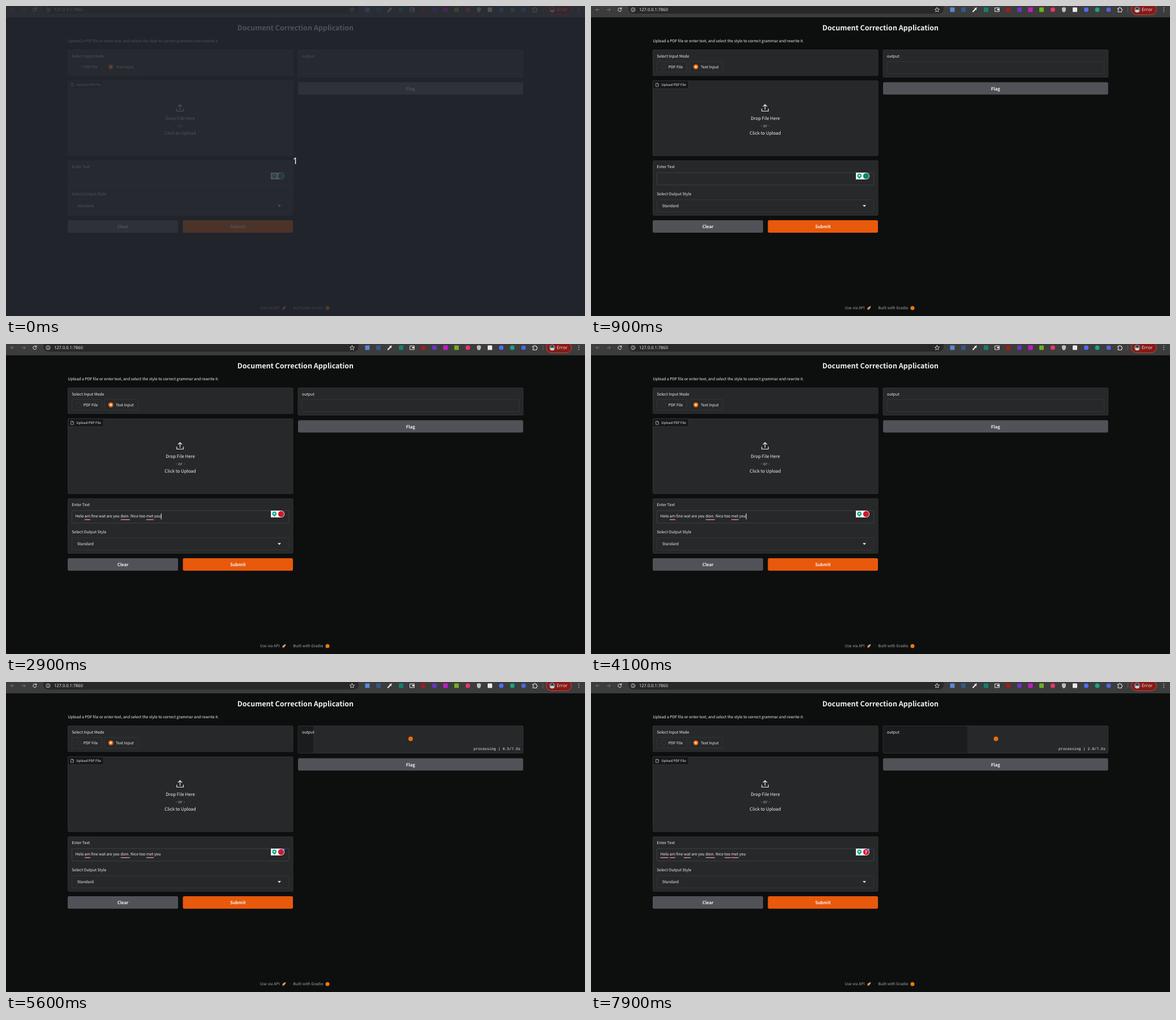
An HTML page that plays this animation: 1023 px wide and 547 px high, repeating every 8 s.

```html
<!DOCTYPE html>
<html lang="en">
<head>
<meta charset="utf-8">
<title>Document Correction Application</title>
<style>
  html, body { margin: 0; height: 100%; overflow: hidden; background: #0d0f0f; }
  svg { display: block; width: 100vw; height: 100vh; }
  text { font: 6.82px "Noto Sans CJK JP", "Noto Sans CJK SC", "Noto Sans", sans-serif; fill: #f1f1f2; text-rendering: geometricPrecision; white-space: pre; }
  .big { font-size: 7.82px; }
  .small { font-size: 5.9px; }
  .mid { text-anchor: middle; }
  .btn { font-size: 7.7px; font-weight: 600; text-anchor: middle; }
  .title { font-size: 12.5px; font-weight: 600; text-anchor: middle; }
  .dim { fill: #a3a4a8; }
  .ui { font: 7.5px "Noto Sans", sans-serif; fill: #e3e3e3; }
  .mono { font: 6.58px "Liberation Mono", monospace; text-anchor: end; }
  .panel { fill: #262829; stroke: #3c3d40; stroke-width: .7; }
  .line { fill: none; stroke: #ececec; stroke-width: 1; stroke-linecap: round; stroke-linejoin: round; }
</style>
</head>
<body>
<svg viewBox="0 0 1023 547" preserveAspectRatio="none">
  <!-- browser bar -->
  <path fill="#3c3c3c" d="M0 0H1023V20H0Z"/>
  <path fill="#282828" d="M66 0H623V5a8.5 8.5 0 0 1-8.5 8.5H74.500a8.500 8.500 0 0 1-8.500-8.500Z"/>
  <path class="line" style="stroke:#777" d="M14.500 6.500H8.500M11 4L8.500 6.500 11 9M28 6.500H34M31.500 4L34 6.500 31.500 9"/>
  <path class="line" d="M53.300 4.500A3.100 3.100 0 1 0 53.900 7.300M53.800 3V5.200H51.600"/>
  <circle class="line" cx="74.300" cy="6.500" r="3.500" style="stroke-width:.8"/>
  <path class="line" style="stroke-width:.9" d="M74.300 6.200V8.300M74.300 4.700V4.800"/>
  <text class="ui" x="85" y="9.200">127.0.0.1:7860</text>
  <path class="line" style="stroke-width:.8" d="M611.500 2.500L612.700 5.200 615.600 5.500 613.400 7.400 614.100 10.300 611.500 8.800 608.900 10.300 609.600 7.400 607.400 5.500 610.300 5.200Z"/>
  <g id="icons"></g>
  <path class="line" d="M675 9.800L679 5.500" style="stroke-width:2.200"/>
  <path class="line" d="M678.300 3.800L680.700 6.200M679.800 4.800L681.200 3.300" style="stroke-width:1.500"/>
  <path class="line" d="M714 3.300H721.300V9.800H714Z"/>
  <path fill="#ececec" d="M717.500 5H721V7.500H717.500Z"/>
  <path fill="#b9bec2" d="M835.500 2L839 3.300V6.500Q839 9.800 835.500 11.300 832 9.800 832 6.500V3.300Z"/>
  <path class="line" d="M931 4H933.200Q933 2.300 934.300 2.300 935.600 2.300 935.400 4H937.500V6Q939 5.800 939 7 939 8.200 937.500 8V10.500H931V8.500Q932.500 8.500 932.500 7.200 932.500 6 931 6Z"/>
  <path stroke="#626262" d="M948.500 2V11"/>
  <rect x="954.500" y="-3" width="44.500" height="18.500" rx="9.250" fill="#861b17" stroke="#c8574f" stroke-width=".8"/>
  <circle cx="965" cy="6.300" r="5.300" fill="#66798b"/>
  <path fill="#d7cdc8" d="M961 9.800Q961.500 6.500 965 6.500T969 9.800Q965 13.300 961 9.800Z"/>
  <circle cx="965" cy="4.500" r="1.900" fill="#2d3036"/>
  <text class="ui" x="973" y="9.300" style="font-size:8px;fill:#f6dcda">Error</text>
  <path class="line" style="stroke-width:1.500" d="M1012 3.200h.01M1012 6.500h.01M1012 9.800h.01"/>

  <!-- page -->
  <text class="title" x="511.500" y="42.500">Document Correction Application</text>
  <text x="109.300" y="64.300">Upload a PDF file or enter text, and select the style to correct grammar and rewrite it.</text>

  <rect class="panel" x="109.500" y="77.500" width="397.500" height="45.300" rx="1.500"/>
  <text x="116.300" y="90.500">Select Input Mode</text>
  <rect class="panel" x="116.700" y="97.700" width="52.800" height="19" rx="2"/>
  <rect class="panel" x="174" y="97.700" width="58.800" height="19" rx="2"/>
  <circle class="panel" cx="128" cy="107.300" r="4.200"/>
  <circle cx="185.200" cy="107.300" r="4.400" fill="#ee650f"/>
  <circle cx="185.200" cy="107.300" r="1.700" fill="#fff"/>
  <text x="136.700" y="109.800">PDF File</text>
  <text x="194" y="109.800">Text Input</text>

  <rect class="panel" x="109.500" y="132" width="397.500" height="132" rx="1.500"/>
  <path fill="#161819" stroke="#3c3d40" stroke-width=".7" d="M109.500 132H172.500V144.500a1.500 1.500 0 0 1-1.500 1.500H109.500Z"/>
  <path class="line" style="stroke-width:.6" d="M115 136.300H117.700L119.200 137.800V142H115ZM117.700 136.300V137.800H119.200"/>
  <text class="small" x="124.300" y="141.200">Upload PDF File</text>
  <path class="line" style="stroke-width:1.200" d="M301.800 181.500V185.500H313.300V181.500M307.500 182.500V173.800M304.300 177L307.500 173.800 310.700 177"/>
  <text class="big mid" x="308" y="200.900">Drop File Here</text>
  <text class="big mid dim" x="308" y="214">- or -</text>
  <text class="big mid" x="308" y="227.300">Click to Upload</text>

  <rect class="panel" x="109.500" y="273" width="397.500" height="96.300" rx="1.500"/>
  <text x="116.300" y="286.200">Enter Text</text>
  <rect class="panel" x="116.500" y="294" width="383.300" height="21.800" rx="2" style="stroke:#4a4b50"/>
  <text id="typed" x="122.500" y="306.300">Helo am fine wat are you doin. Nice too met you</text>
  <g id="marks" fill="#ee8794"></g>
  <rect id="caret" y="299" width="1" height="10.500" fill="#f1f1f2"/>
  <path fill="#fff" d="M468 294H486a6 6 0 0 1 0 12H468Z"/>
  <path fill="#15a78c" d="M474.200 295.500a4 4 0 0 1 2 7.400L474.200 305 472.200 302.900a4 4 0 0 1 2-7.400Z"/>
  <circle cx="474.200" cy="299.300" r="1.400" fill="#fff"/>
  <circle id="badge" cx="486" cy="300" r="5.200"/>
  <text id="count" class="ui mid" x="485.800" y="302.800" style="font-weight:700;fill:#fff">7</text>
  <g id="plus"><circle cx="490" cy="296" r="2.300" fill="#4966cf"/><path stroke="#fff" stroke-width=".7" d="M488.700 296h2.600M490 294.700v2.600"/></g>
  <text x="116.300" y="334.200">Select Output Style</text>
  <rect class="panel" x="116.500" y="342" width="383.300" height="21.300" rx="2"/>
  <text x="125.800" y="355">Standard</text>
  <path fill="#f1f1f2" d="M480 351.300H486L483 354.400Z"/>

  <rect x="109" y="378" width="195" height="22" rx="2.500" fill="#515257"/>
  <text class="btn" x="206.500" y="392.300">Clear</text>
  <rect id="submit" x="312.500" y="378" width="194.500" height="22" rx="2.500"/>
  <text class="btn" x="409.700" y="392.300">Submit</text>

  <rect class="panel" x="516" y="77.500" width="397.700" height="48" rx="1.500"/>
  <rect id="result" class="panel" x="523" y="98" width="383.700" height="21.500" rx="2"/>
  <rect id="bar" x="516.400" y="77.900" height="47.200" fill="#1b1c1e"/>
  <text x="523" y="90.500">output</text>
  <g id="busy">
    <circle id="loader" cy="100.300" r="4" fill="#ee6a12"/>
    <text id="timer" class="mono" x="909" y="119.800"></text>
  </g>
  <rect id="flag" x="516" y="134.500" width="397.700" height="21.700" rx="2.500"/>
  <text class="btn" x="714.800" y="148.700">Flag</text>

  <text class="dim" x="448.800" y="535.300">Use via API</text>
  <path fill="#d9a377" d="M494.500 529.500Q491 530 489.500 532.200L487.800 533 491 536.200 491.800 534.500Q494 533 494.500 529.500Z"/>
  <path fill="#b4502c" d="M488.800 534L487.500 536.700 490.200 535.400Z"/>
  <text class="dim" x="500.700" y="535.300">·</text>
  <text class="dim" x="507.200" y="535.300">Built with Gradio</text>
  <circle cx="568" cy="533" r="3.500" fill="#ee7a10"/>

  <!-- countdown -->
  <g id="intro">
    <rect width="1023" height="547" fill="#262a32" opacity=".8"/>
    <text class="mid" x="511" y="279" style="font:16px 'Noto Sans',sans-serif;fill:#fff">1</text>
  </g>
</svg>
<script>
const $ = id => document.getElementById(id);
const show = (id, on) => $(id).setAttribute('visibility', on ? 'visible' : 'hidden');
const set = (id, name, value) => $(id).setAttribute(name, value);
const clamp = v => Math.max(0, Math.min(1, v));
const mix = (a, b, k) => `rgb(${a.map((v, i) => Math.round(v + (b[i] - v) * k))})`;

function add(parent, tag, attrs) {
  const el = document.createElementNS('http://www.w3.org/2000/svg', tag);
  for (const key in attrs) el.setAttribute(key, attrs[key]);
  return $(parent).appendChild(el);
}

// toolbar icons: centre x, colour, corner radius
[[638.5, '#5b87d6', 1], [658, '#33588a', 1], [698, '#128071', 1], [737, '#a51c1c', 4],
 [757, '#6a35c4', 2], [776.5, '#c11cc6', 1], [796, '#6fae27', 1], [816, '#e4376b', 4],
 [855, '#e9e9e9', 1], [875, '#4d6ff0', 4], [894.5, '#15a585', 4], [914.5, '#4a68dc', 4]]
  .forEach(([x, fill, rx]) => add('icons', 'rect', { x: x - 4, y: 2.5, width: 8, height: 8, rx, fill }));

// underlined words: left, width, start time
const marks = [[139, 10, 1500], [202.8, 16, 1500], [248, 12.8, 1800],
  [122.5, 14.3, 5600], [164, 12, 5800], [236, 11, 5800]]
  .map(([x, width, start]) => ({ width, start, el: add('marks', 'rect', { x, y: 309.2, height: 1.4 }) }));

function draw(t) {
  show('intro', t < 100);

  const pasted = t >= 1200;
  show('typed', pasted);
  const blink = pasted ? t < 4700 && (t - 1200) % 1150 < 650 : t >= 300 && t < 900;
  show('caret', blink);
  set('caret', 'x', pasted ? 273.7 : 122);
  for (const m of marks) m.el.setAttribute('width', m.width * clamp((t - m.start) / 400));

  set('badge', 'fill', mix([18, 130, 110], [212, 22, 48], clamp((t - 1400) / 500)));
  show('plus', t >= 5300);
  show('count', t >= 6000);

  set('flag', 'fill', t >= 3500 && t < 3900 ? '#5d5e64' : '#515257');
  set('submit', 'fill', t >= 4500 && t < 5400 ? '#f0640f' : '#e8590c');

  const spent = (t - 5100) / 1000, busy = spent >= 0;
  show('busy', busy);
  show('result', !busy);
  set('bar', 'width', busy ? 397 * spent / 7.5 : 0);
  set('loader', 'cx', 714 + 1.5 * Math.sin(spent * 5));
  $('timer').textContent = `processing | ${Math.max(0, spent).toFixed(1)}/7.5s`;
}

const begin = performance.now();
function frame() {
  const t = (performance.now() - begin) % 8000;
  draw(Math.floor(t / 100) * 100);
  requestAnimationFrame(frame);
}
frame();
</script>
</body>
</html>
```
